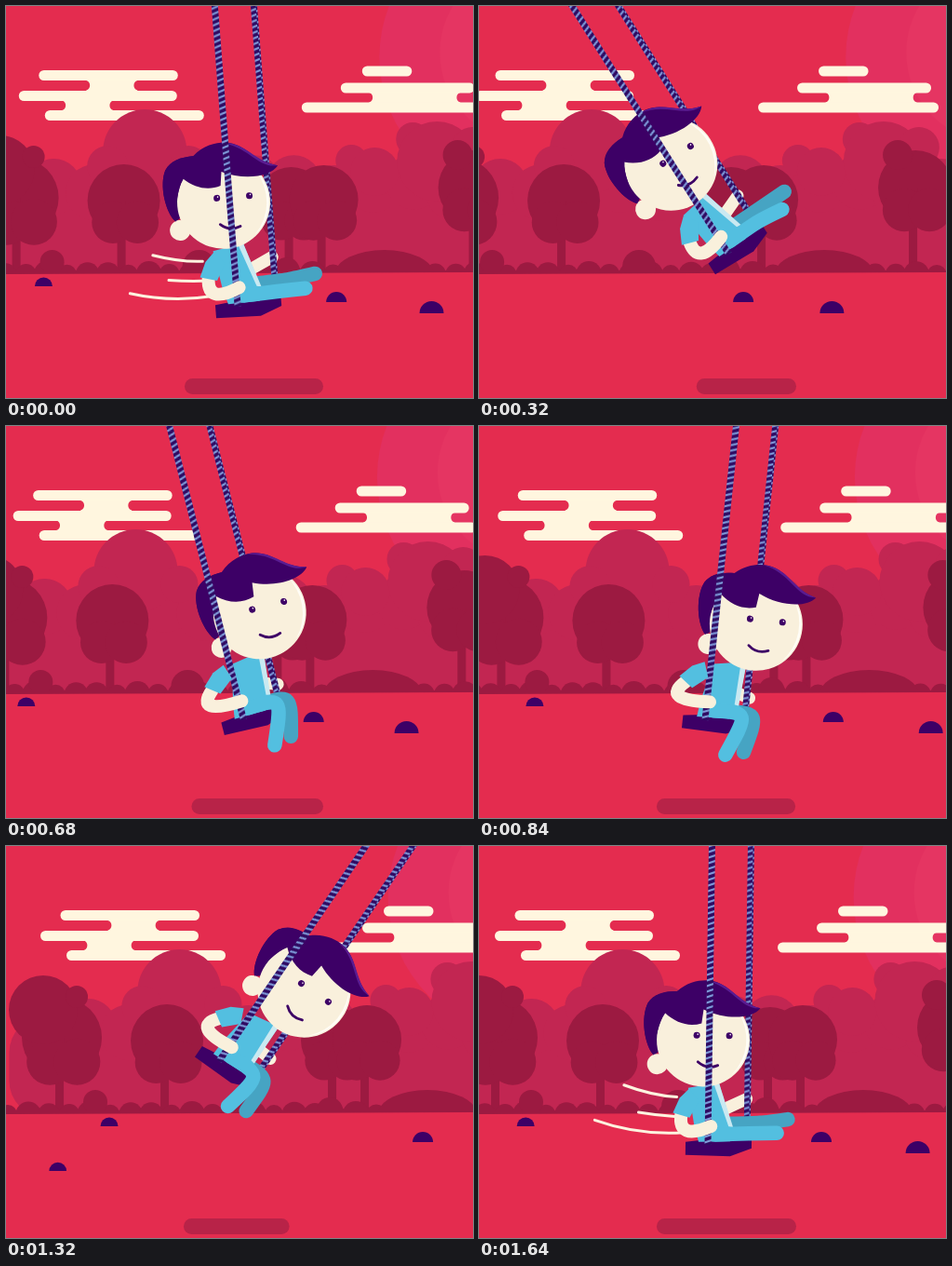
These frames come from a looping animation (502x421 px, 1.68 s). An HTML page:

```html
<!DOCTYPE html>
<html lang="en">
<head>
<meta charset="utf-8">
<title>Swing</title>
<style>
html, body { margin: 0; width: 100%; height: 100%; overflow: hidden; background: #e42c4f; }
svg { display: block; width: 502px; height: 421px; }
</style>
</head>
<body>
<svg id="stage" viewBox="0 0 502 421" xmlns="http://www.w3.org/2000/svg">
  <defs>
    <pattern id="twist" width="8" height="6" x="-4" patternUnits="userSpaceOnUse">
      <rect width="8" height="6" fill="#2f0a62"/>
      <path d="M-1-1L9-4.5M-1 5L9 1.5M-1 11L9 7.5" stroke="#7f9cdb" stroke-width="2.2"/>
    </pattern>
  </defs>
  <rect width="502" height="421" fill="#e42c4f"/>
  <g id="sun">
    <circle cx="551" cy="55" r="150" fill="#e2305f"/>
    <circle cx="562" cy="50" r="96" fill="#e53562"/>
  </g>
  <g id="clouds" fill="#fff6df"></g>
  <g id="hills" fill="#c22652"></g>
  <g id="trees" fill="#9c1a41"></g>
  <path d="M0 288L502 286V421H0Z" fill="#e42c4f"/>
  <g id="stones" fill="#3d0066"></g>
  <rect id="shade" y="400" height="17" rx="8.5" fill="#b82348"/>
  <g id="swing" stroke-linecap="round" stroke-linejoin="round">
    <g id="swish" fill="none" stroke="#fdf3df" stroke-width="3">
      <path d="M-34-50Q-60-51-91-62" pathLength="1"/>
      <path d="M-36-29Q-55-30-75-33" pathLength="1"/>
      <path d="M-26-12Q-75-8-122-24" pathLength="1"/>
    </g>
    <path id="backArm" fill="none" stroke="#f9f0dc" stroke-width="13"/>
    <rect x="38.5" y="-620" width="7" height="612" fill="url(#twist)"/>
    <path d="M-24-2L0-5 47-6 47 4 24 13-24 12Z" fill="#3d0066"/>
    <path id="backLeg" fill="none" stroke="#46a4c3" stroke-width="15.5"/>
    <g id="torso">
      <path d="M-22-60L11-66 26-18 24-3-10-2-15-20Z" fill="#53bfe0"/>
      <path d="M11-66L27-18 22-19 5-66Z" fill="#c9e9f1"/>
    </g>
    <path id="leg" fill="none" stroke="#53bfe0" stroke-width="15.5"/>
    <g id="head">
      <path d="M-46 22C-56 12-61-18-53-34C-46-44-34-47-20-47L0-30-30 10Z" fill="#3d0066"/>
      <circle cx="7" cy="5" r="50" fill="#f9f0dc"/>
      <path d="M44-26A47 47 0 0 1 38 42A54 54 0 0 0 44-26Z" fill="#fffdf6"/>
      <circle cx="-42" cy="31.5" r="11" fill="#f9f0dc"/>
      <path d="M-46 22C-56 12-61-18-53-34C-47-44-36-47-22-47C-10-58 4-60 14-59C36-56 42-36 68-30C60-19 32-16 7-28L5-13C-8-9-22-12-35-24C-41-12-45 4-46 22Z" fill="#3d0066"/>
      <path d="M8-59C36-59 42-36 68-30C46-28 38-54 8-59Z" fill="#5a1c92"/>
      <g fill="#3d0066"><circle r="3.5"/><circle cx="35" r="3.5"/></g>
      <g fill="#fff"><circle cx="1" cy="-1.2" r=".8"/><circle cx="36" cy="-1.2" r=".8"/></g>
      <path d="M1.5 28.5Q11 37 23 32" fill="none" stroke="#3d0066" stroke-width="2.8"/>
    </g>
    <rect x="-3.5" y="-620" width="7" height="621" fill="url(#twist)"/>
    <path id="arm" fill="none" stroke="#f9f0dc" stroke-width="14"/>
    <path id="sleeve" d="M-7-5L-17 5-24 21-6 26 4 8Z" fill="#53bfe0"/>
  </g>
</svg>
<script>
const LOOP = 1680, STEP = 40;
const $ = id => document.getElementById(id);
const mix = (a, b, k) => a + (b - a) * k;
const ease = (from, to, t) => {
  const u = Math.min(1, Math.max(0, (t - from) / (to - from)));
  return u * u * (3 - 2 * u);
};

// Scenery
const circle = (x, y, r) => `<circle cx="${x}" cy="${y}" r="${r}"/>`;
const box = (x, y, w, h, r = 0) => `<rect x="${x}" y="${y}" width="${w}" height="${h}" rx="${r}"/>`;
const row = (n, f) => Array.from({ length: n }, (_, i) => f(i)).join('');
const bar = (x0, x1, y) => box(x0, y, x1 - x0, 11, 5.5);
// Joins two bars, with a round notch on either side
const bridge = (a, b, y) => {
  const r = 5.5;
  return `<path d="M${a - r} ${y - .3}V${y}A${r} ${r} 0 0 1 ${a - r} ${y + 10.5}v.5H${b + r}v-.5A${r} ${r} 0 0 1 ${b + r} ${y}v-.3Z"/>`;
};

$('clouds').innerHTML =
  bar(34.5, 184, 69) + bridge(91, 135, 80) + bar(13, 183, 91) + bridge(65, 109, 101.5) + bar(41, 212, 112) +
  bar(382, 435.5, 64.5) + bar(359, 503, 82.5) + bridge(395, 482, 93) + bar(317, 511, 103.5);

$('hills').innerHTML = box(-35, 182, 660, 110, 40) +
  row(14, i => circle(50 + 43 * i, 194 + 7 * Math.sin(i * 2), 30)) +
  circle(148, 156, 45) + circle(108, 172, 22) + circle(195, 170, 20) +
  circle(370, 166, 17) + circle(395, 178, 26) +
  circle(436, 143, 18) + circle(462, 167, 43) + circle(500, 152, 22);

// A round crown with two lobes underneath, on a trunk
const tree = (x, y, r) => circle(x, y, r) + box(x - 7, y, 9, 290 - y) +
  [-.3, .38].map(d => circle(x + d * r, y + .6 * r, .58 * r)).join('');

$('trees').innerHTML =
  tree(12, 206, 43) + circle(-8, 176, 37) + circle(28, 162, 12) +
  tree(125, 209, 39) + tree(305, 209, 36) + tree(340, 208, 37) +
  tree(503, 195, 40) + circle(484, 160, 16) +
  row(32, i => circle(-90 + 22 * i, 288, 12 + 2 * Math.sin(i * 2.4))) +
  circle(48, 275, 13) + circle(206, 280, 18) + circle(300, 284, 14) +
  '<ellipse cx="405" cy="288" rx="53" ry="26"/>' + box(-100, 284, 720, 5);

// Stones: x, ground y, radius, depth
const stones = [[38, 301, 9.5, .76], [352, 318, 11, 1], [454, 330, 13, 1.1], [-146, 349, 9.3, 2.1]];
$('stones').innerHTML = stones.map(([, , r]) => `<path d="M${-r} 0A${r} ${r} 0 0 1 ${r} 0Z"/>`).join('');

const draw = (id, d) => $(id).setAttribute('d', d);
const move = (el, x, y = 0, turn = 0) => el.setAttribute('transform', `translate(${x} ${y}) rotate(${turn})`);

// A leg bent round a knee; the foot swings on an arc below it
function limb(id, hip, knee, pivot, angle, length) {
  const a = angle * Math.PI / 180;
  const foot = [pivot[0] + length * Math.cos(a), pivot[1] + length * Math.sin(a)];
  draw(id, `M${hip}C${knee} ${knee} ${foot}`);
}

const depth = { sun: .1, clouds: .25, hills: .4, trees: .5 };
const trails = [...$('swish').children];

function render(t) {
  const s = Math.sin((t + 40) / LOOP * 2 * Math.PI);
  const pan = 16 - 86 * s;
  const back = 1 - ease(1310, 1620, t);
  const lean = ease(240, 630, t) * (1 - .23 * ease(760, 1160, t)) * back;
  const bend = ease(260, 690, t) * (1 - .12 * ease(840, 1320, t)) * back;
  const rush = t < 840 ? 1 - ease(-40, 200, t) : ease(1440, 1640, t);

  // Parallax; pan is about zero when the loop starts
  for (const id in depth) move($(id), pan * depth[id]);
  stones.forEach(([x, y, , d], i) => move($('stones').children[i], x + pan * d, y));

  const left = 191 + 45 * Math.max(0, s) ** 2;
  const right = 341 - 42 * Math.min(0, s) ** 2;
  $('shade').setAttribute('x', left);
  $('shade').setAttribute('width', right - left);

  // The seat rises on both sides, higher when swinging back
  move($('swing'), 246 + 20 * s + 2.5 * s * s, 320 + 22 * s - 80 * s * s, .8 - 35 * s + 1.1 * s * s);

  $('torso').setAttribute('transform', `matrix(1 0 ${-.42 * lean} 1 0 0)`);
  move($('head'), mix(-13.5, 38, lean), -116.5 - 24 * lean + 29 * lean * lean);
  move($('sleeve'), mix(-14, -2, lean), -54, 22 * lean);
  draw('arm', `M${mix(-29, -25, lean)} ${mix(-32, -38, lean)}Q${mix(-33, -50, lean)} ${mix(-3, -16, lean)} 3-19`);
  draw('backArm', `M${mix(18, 30, lean)} ${mix(-38, -32, lean)}L${mix(41, 45, lean)} ${mix(-49, -27, lean)}`);
  limb('leg', [8, -10], [46, -12], [36, mix(-12, -6, bend)], mix(-1, 104, bend), mix(38, 43, bend));
  const rise = mix(-22, -11, bend);
  limb('backLeg', [24, rise], [56, rise - 1], [50, rise], mix(-9, 97, bend), mix(36, 42, bend));

  trails.forEach((el, i) => {
    const w = i ? Math.max(0, rush * 1.1 - .1) : rush;
    el.setAttribute('stroke-dasharray', `${w} 2`);
    el.style.display = w > .01 ? '' : 'none';
  });
}

// One pose every 40 ms
const start = performance.now();
function tick() {
  const t = Math.max(0, performance.now() - start) % LOOP;
  render(Math.floor(t / STEP) * STEP);
  requestAnimationFrame(tick);
}
tick();
</script>
</body>
</html>
```
